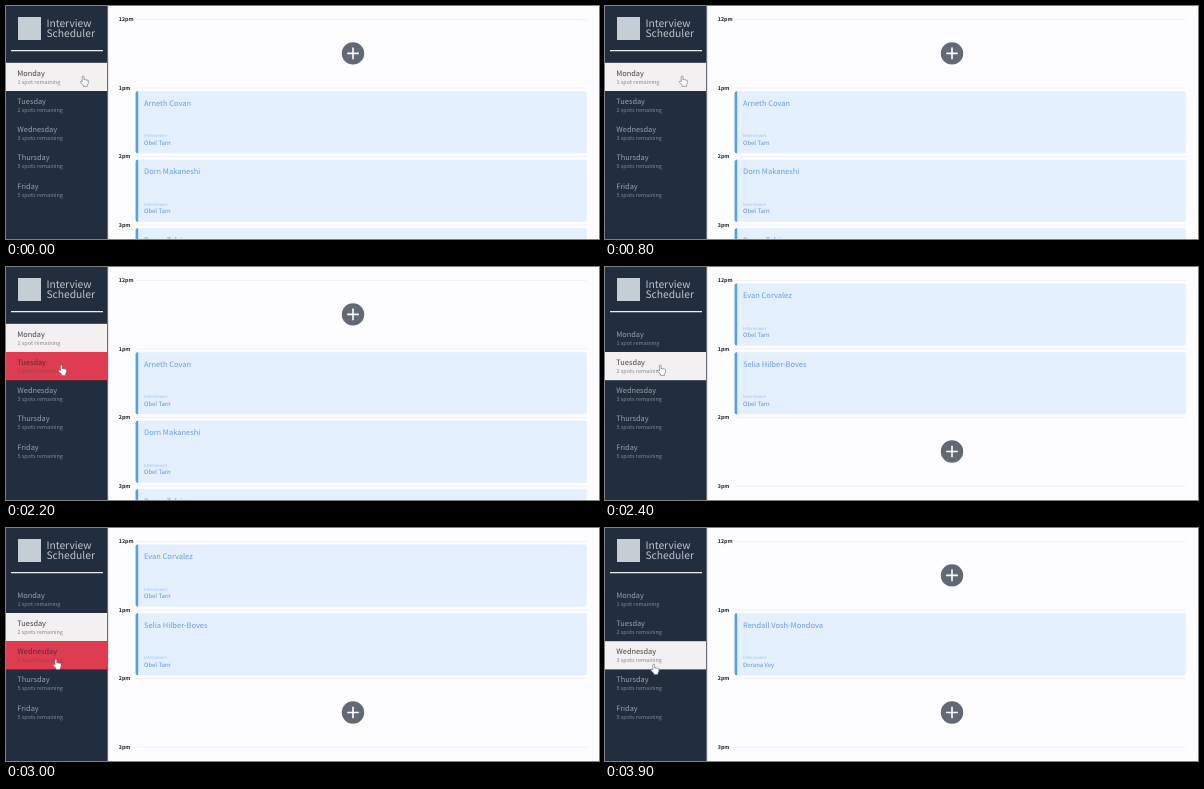
These frames come from a looping animation (593x233 px, 4 s). An HTML page:

```html
<!DOCTYPE html>
<html lang="en">
<head>
<meta charset="utf-8">
<title>Interview Scheduler</title>
<style>
  html, body { margin: 0; width: 100%; height: 100%; overflow: hidden; background: #fdfcfe; }
  svg { display: block; width: 593px; height: 233px; }
  text {
    font-family: "Noto Sans CJK JP", "Noto Sans CJK SC", "Noto Sans CJK", "Open Sans", sans-serif;
    text-rendering: geometricPrecision;
  }
  .brand { font-size: 10.3px; font-weight: 300; fill: #bcc3cb; }
  .hour { font-size: 5.3px; font-weight: 700; fill: #222; }
  .name { font-size: 7.5px; fill: #6b9cf2; }
  .role { font-size: 4.4px; font-weight: 300; fill: #a3bff7; }
  .host { font-size: 5.95px; fill: #5f90f0; }
  .day .title { font-size: 7.4px; fill: #98a2af; }
  .day .spots { font-size: 5.5px; font-weight: 300; fill: #7f8a98; }
  .day rect { fill: none; }
  .day.hover rect { fill: #de3c51; }
  .day.hover .title { fill: #5e2838; }
  .day.hover .spots { fill: #a5404f; }
  .day.selected rect { fill: #f2f0f1; }
  .day.selected .title { fill: #43434b; }
  .day.selected .spots { fill: #8b898f; }
</style>
</head>
<body>
<svg id="stage" viewBox="0 0 593 233"></svg>
<script>
const LOOP = 4000, STEP = 100;
const ROW_TOP = 56.8, ROW = 28.2;
const SLOT_TOP = 13.4, SLOT = 68.55;

const days = [
  ["Monday", "1 spot remaining"],
  ["Tuesday", "2 spots remaining"],
  ["Wednesday", "3 spots remaining"],
  ["Thursday", "5 spots remaining"],
  ["Friday", "5 spots remaining"]
];
const hours = ["12pm", "1pm", "2pm", "3pm"];

// One schedule per selectable day; null is a free slot.
const schedules = [
  [null, ["Arneth Covan", "Obel Tarn"], ["Dorn Makaneshi", "Obel Tarn"], ["Boren Talvic", "Obel Tarn"]],
  [["Evan Corvalez", "Obel Tarn"], ["Selia Hilber-Boves", "Obel Tarn"], null, null],
  [null, ["Rendall Vosh-Mondova", "Dorana Vey"], null, null]
];

// Cursor moves: start, end, destination.
const home = [74, 69.6];
const moves = [
  [1600, 1900, [52.2, 97.6]],
  [2600, 3000, [46.8, 130.8]],
  [3500, 3600, [47.6, 131]],
  [3800, 3900, [45.6, 135.8]]
];
const clicks = [2400, 3600];

const label = (x, y, cls, str) => `<text x="${x}" y="${y}" class="${cls}">${str}</text>`;

const dayRow = ([title, spots], i) => {
  const y = ROW_TOP + i * ROW;
  return `<g class="day"><rect y="${y}" width="101" height="${ROW}"/>` +
    label(11.3, y + 12.9, "title", title) + label(11.5, y + 20.9, "spots", spots) + "</g>";
};

const hourMark = (hour, i) => {
  const y = SLOT_TOP + i * SLOT;
  return label(112.8, y + 1.7, "hour", hour) +
    `<path d="M130 ${y}H581" stroke="#f0eff3" stroke-width=".9"/>`;
};

const card = ([name, host], y) =>
  `<rect x="129.6" y="${y}" width="451.2" height="62" rx="2" fill="#e4f0fd"/>` +
  `<path d="M132.2 ${y}v62h-.6a2 2 0 0 1-2-2v-58a2 2 0 0 1 2-2z" fill="#579fea"/>` +
  label(138, y + 14.7, "name", name) +
  label(138, y + 46, "role", "Interviewer") +
  label(138, y + 53.5, "host", host);

const addButton = y =>
  `<circle cx="347" cy="${y}" r="11.2" fill="#626974"/>` +
  `<path d="M341.2 ${y}h11.6M347 ${y - 5.8}v11.6" stroke="#fff" stroke-width="1.6"/>`;

const schedule = slots => `<g class="schedule">` + slots.map((slot, i) => {
  const y = SLOT_TOP + i * SLOT;
  return slot ? card(slot, y + 3.2) : addButton(y + 34);
}).join("") + "</g>";

const stage = document.getElementById("stage");
stage.innerHTML =
  `<rect width="593" height="233" fill="#fdfcfe"/>` +
  `<rect width="102.6" height="233" fill="#d5d5da"/>` +
  `<rect width="101.6" height="233" fill="#222d3d"/>` +
  `<rect x="12" y="11" width="23" height="23" fill="#c5ced4"/>` +
  label(40.4, 20.9, "brand", "Interview") + label(40.4, 31.2, "brand", "Scheduler") +
  `<path d="M5 44.7H97" stroke="#eef0f2" stroke-width="1.2"/>` +
  days.map(dayRow).join("") +
  hours.map(hourMark).join("") +
  schedules.map(schedule).join("") +
  `<path id="hand" d="M2.2 6.2V1.3a.9.9 0 0 1 1.8 0V4.4a.8.8 0 0 1 1.5.1.8.8 0 0 1 1.5.3.7.7 0 0 1 1.3.5V7.6L7.3 9.5v1.3h-4V9.6L.4 6.6a.8.8 0 0 1 1.2-1z"
    fill="#fff" stroke="#66666c" stroke-width=".6" stroke-linejoin="round"/>`;

const rows = [...stage.querySelectorAll(".day")];
const panels = [...stage.querySelectorAll(".schedule")];
const hand = document.getElementById("hand");

const ease = p => p * p * (3 - 2 * p);

function cursorAt(t) {
  let pos = home;
  for (const [start, end, to] of moves) {
    const p = ease(Math.min(1, Math.max(0, (t - start) / (end - start))));
    pos = pos.map((v, i) => v + (to[i] - v) * p);
  }
  return pos;
}

function render(time) {
  const t = Math.floor((time % LOOP) / STEP) * STEP;
  const [x, y] = cursorAt(t);
  const selected = clicks.filter(c => t >= c).length;
  const hovered = Math.floor((y + 1 - ROW_TOP) / ROW);
  rows.forEach((row, i) => {
    row.classList.toggle("selected", i === selected);
    row.classList.toggle("hover", i === hovered);
  });
  panels.forEach((panel, i) => panel.setAttribute("display", i === selected ? "inline" : "none"));
  hand.setAttribute("transform", `translate(${x} ${y})`);
}

let origin;
function tick(now) {
  origin ??= now;
  render(now - origin);
  requestAnimationFrame(tick);
}
render(0);
requestAnimationFrame(tick);
</script>
</body>
</html>
```
